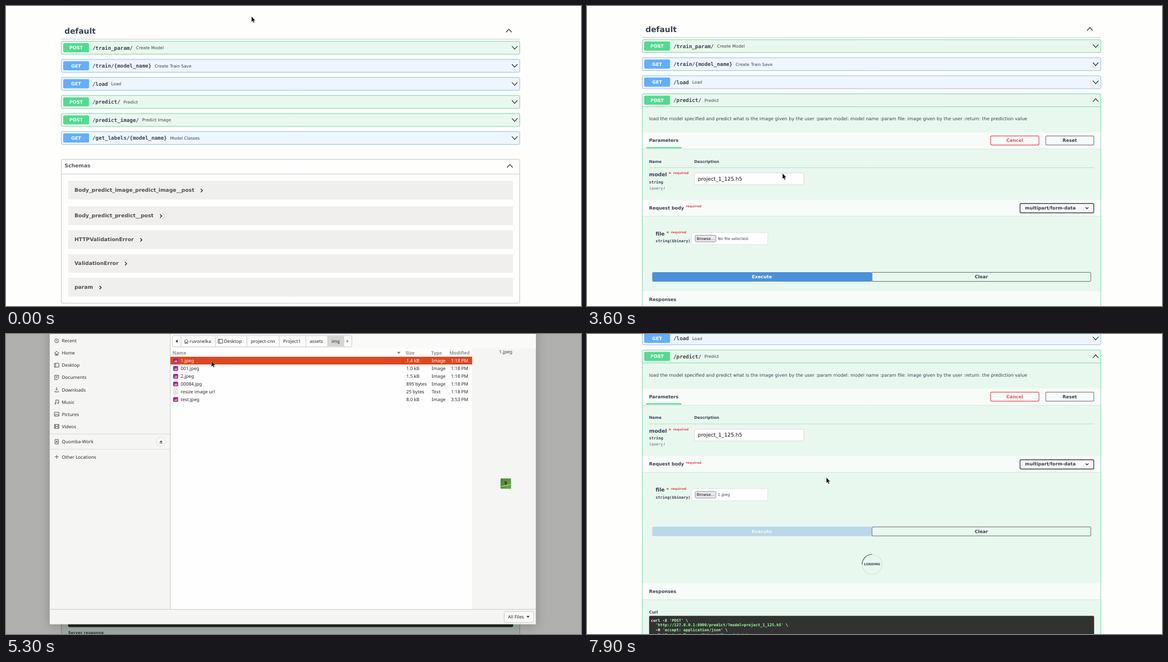
An HTML page with a canvas that plays this animation: 1035 by 541 pixels, repeating every 8 s.

```html
<!DOCTYPE html>
<html lang="en">
<head>
<meta charset="utf-8">
<title>API docs walkthrough</title>
<style>
  html, body { margin: 0; width: 100%; height: 100%; overflow: hidden; background: #fefefd; }
  canvas { display: block; }
</style>
</head>
<body>
<canvas id="stage" width="1035" height="541"></canvas>
<script>
const c = document.getElementById('stage').getContext('2d');
c.textRendering = 'geometricPrecision';
const LOOP = 8000, STEP = 100;
const K = 0.5807; // page zoom: CSS px to stage px
const SANS = '"DejaVu Sans", sans-serif', MONO = '"DejaVu Sans Mono", monospace', UI = '"Noto Sans", sans-serif';
const INK = '#3b4151', RED = '#e2505c', GREEN = '#53db8f', BLUE = '#64aefc', LINE = '#c4c6c8';
const TONES = {
  POST: { badge: GREEN, fill: '#e9f8ee', edge: '#7fd8ae' },
  GET: { badge: BLUE, fill: '#eef6fd', edge: '#93c5f4' }
};

// ---- drawing helpers ----
function text(s, x, y, px, { style = '', family = SANS, color = INK, align = 'left' } = {}) {
  c.font = `${style} ${px * K}px ${family}`;
  c.fillStyle = color;
  c.textAlign = align;
  c.fillText(s, x, y + px * K * 0.365);
  return c.measureText(s).width;
}
const bold = (s, x, y, px = 14, color = INK, align = 'left') => text(s, x, y, px, { style: 'bold', color, align });
const code = (s, x, y, px = 12, color = INK, style = 'bold') => text(s, x, y, px, { style, family: MONO, color });
const ui = (s, x, y, color = '#2b2b2b', style = '500', align = 'left') => text(s, x, y, 14.2, { family: UI, color, style, align });

function box(x, y, x2, y2, fill, stroke, radius = 2, width = 1) {
  c.beginPath();
  c.roundRect(x, y, x2 - x, y2 - y, radius);
  if (fill) { c.fillStyle = fill; c.fill(); }
  if (stroke) { c.strokeStyle = stroke; c.lineWidth = width; c.stroke(); }
}
function poly(points, stroke, width = 1, fill) {
  c.beginPath();
  points.forEach(([x, y]) => c.lineTo(x, y));
  if (fill) { c.closePath(); c.fillStyle = fill; c.fill(); }
  if (stroke) { c.strokeStyle = stroke; c.lineWidth = width; c.stroke(); }
}
const rule = (x, x2, y, color = LINE, width = 1) => poly([[x, y], [x2, y]], color, width);
const chevron = (x, y, w = 5, h = 5, width = 1.15) =>
  poly([[x - w, y - h / 2], [x, y + h / 2], [x + w, y - h / 2]], '#222', width);
const triangle = (x, y, w, h, color) => poly([[x - w, y - h], [x + w, y - h], [x, y + h]], null, 0, color);
function button(label, x, y, x2, y2, color, edge) {
  box(x, y, x2, y2, null, edge, 2, 1.2);
  bold(label, (x + x2) / 2, (y + y2) / 2, 14, color, 'center');
}
function icon(path, x, y, color = '#444') {
  c.save();
  c.translate(x - 4.5, y - 4.5);
  c.strokeStyle = color;
  c.lineWidth = 0.9;
  c.stroke(new Path2D(path));
  c.restore();
}

// ---- timelines: rows of [time, ...values], linear in between ----
function track(keys, t) {
  let i = keys.findIndex(k => k[0] > t);
  if (i < 0) i = keys.length;
  const a = keys[Math.max(i - 1, 0)], b = keys[Math.min(i, keys.length - 1)];
  const p = b[0] > a[0] ? (t - a[0]) / (b[0] - a[0]) : 0;
  return a.slice(1).map((v, n) => typeof v === 'number' ? v + (b[n + 1] - v) * p : v);
}
const SCROLL = [[3400, 0], [3500, 1], [3600, 3], [3700, 40], [3800, 66], [3900, 66], [4000, 105], [4100, 132.5]];
const DIALOG = [[4300, 0], [4400, .15], [4600, .75], [4800, 1], [5700, 1], [5800, .6], [5900, .15], [6000, 0]];
const POINTER = [
  [0, 442, 19, 'arrow'], [300, 442, 19, 'arrow'], [500, 240, 70, 'hand'], [600, 127, 112, 'hand'],
  [700, 241, 145, 'hand'], [800, 241, 145, 'hand'], [900, 205, 176, 'hand'], [1600, 205, 176, 'hand'],
  [1700, 222, 200, 'arrow'], [2000, 303, 311, 'beam'], [2300, 303, 311, 'beam'], [2800, 352, 311, 'beam'],
  [2900, 352, 311, 'beam'], [3100, 352, 302, 'arrow'], [3900, 352, 302, 'arrow'], [4100, 204, 290, 'arrow'],
  [4900, 204, 290, 'arrow'], [5300, 370, 49, 'arrow'], [5700, 370, 49, 'arrow'], [6000, 352, 93, 'arrow'],
  [6200, 286, 334, 'arrow'], [6300, 286, 334, 'arrow'], [6600, 287, 349, 'hand'], [6700, 287, 350, 'hand'],
  [7000, 287, 350, 'hand'], [7100, 308, 337, 'arrow'], [7700, 431, 259, 'arrow']
];
const SHAPES = {
  arrow: 'M0 0V9.6L2.2 7.7L3.7 11.2L5.2 10.5L3.7 7.1H6.6Z',
  hand: 'M-.9 .8Q0-.6 .9 .8V4.2L4.6 5Q5.4 5.3 5.2 6.5L4.4 11H-.8L-3 7.4Q-3.2 6 -.9 7.2Z',
  beam: 'M-1.8-5H1.8V-4.4H.4V4.4H1.8V5H-1.8V4.4H-.4V-4.4H-1.8Z'
};
function pointer(t) {
  const [x, y, kind] = track(POINTER, t);
  const shape = new Path2D(SHAPES[kind]);
  c.save();
  c.translate(x, y);
  c.lineWidth = kind === 'hand' ? 0.9 : 1;
  c.fillStyle = kind === 'hand' ? '#fff' : '#1a1a1a';
  c.strokeStyle = kind === 'hand' ? '#222' : '#fff';
  c.stroke(shape);
  c.fill(shape);
  if (kind === 'hand') c.stroke(shape);
  c.restore();
}

// ---- API page ----
const ROUTES = [
  ['POST', '/train_param/', 'Create Model'], ['GET', '/train/{model_name}', 'Create Train Save'],
  ['GET', '/load', 'Load'], ['POST', '/predict/', 'Predict'],
  ['POST', '/predict_image/', 'Predict Image'], ['GET', '/get_labels/{model_name}', 'Model Classes']
];
const SCHEMAS = [['Body_predict_image_predict_image__post', 332], ['Body_predict_predict__post', 378],
  ['HTTPValidationError', 421], ['ValidationError', 464], ['param', 507]];
const CURL = `curl -X 'POST' \\
  'http://127.0.0.1:8000/predict/?model=project_1_125.h5' \\
  -H 'accept: application/json' \\
  -H 'Content-Type: multipart/form-data' \\
  -F 'file=@1.jpeg;type=image/jpeg'`.split('\n');

function route([method, path, note], i, open) {
  const y = 75.2 + i * 32.55, tone = TONES[method], bottom = open ? 900 : y + 11.6;
  c.save();
  c.shadowColor = 'rgba(0,0,0,.19)';
  c.shadowBlur = 2;
  box(99.7, y - 11.4, 924.7, bottom, tone.fill);
  c.restore();
  box(99.7, y - 11.4, 924.7, bottom, null, tone.edge);
  if (open) rule(100, 924.5, y + 11.8, tone.edge);
  box(103, y - 8.2, 149.5, y + 8.2, tone.badge);
  bold(method, 126.2, y, 14, '#fff', 'center');
  const width = code(path, 155.5, y, 16);
  text(note, 155.5 + width + 5.8, y, 13);
  chevron(915.6, y, 5, open ? -5.5 : 5.5);
}

function schemas() {
  box(99.5, 276.5, 924.7, 536, null, LINE);
  rule(100, 924.5, 303);
  bold('Schemas', 105.5, 288, 16, '#5a5c60');
  chevron(907, 288.5, 5, -5.5);
  for (const [name, y] of SCHEMAS) {
    box(111.8, y - 16.7, 912.8, y + 17, '#f1efee');
    const x = 123.2 + bold(name, 123.2, y, 16, '#505050') + 11.8;
    poly([[x, y - 2.2], [x + 3, y + .8], [x, y + 3.8]], '#222', 1.3);
  }
}

function strip(y, y2) {
  c.fillStyle = 'rgba(255,255,255,.65)';
  c.fillRect(100.2, y, 824, y2 - y);
  rule(100.2, 924.2, y2, 'rgba(0,0,0,.09)');
}
function required(x, y, star) {
  if (star) bold('*', x - 8.3, y + 2, 16, RED);
  bold('required', x, y, 10, RED);
}

function form(t) {
  text('load the model specified and predict what is the image given by the user :param model: model name ' +
    ':param file: image given by the user :return: the prediction value', 111.8, 206.3, 14);
  strip(231, 261);
  bold('Parameters', 111.8, 245.3);
  rule(106.5, 170.3, 258.6, GREEN, 2.2);
  button('Cancel', 726.5, 237.3, 813.5, 253.6, RED, RED);
  button('Reset', 825.7, 237.3, 912.3, 253.6, INK, '#7f8683');
  bold('Name', 111.8, 283.3, 12);
  bold('Description', 193, 283.3, 12);
  rule(111.8, 912.8, 294.6, '#c7d5cf');
  bold('model', 111.8, 306.7, 16);
  required(155, 304, true);
  code('string', 111.8, 320);
  code('(query)', 111.8, 331.3, 12, '#666b70', 'italic');
  const focused = t >= 2400 && t < 3100;
  box(193.2, 304.2, 390.4, 325.3, '#fff', focused ? '#5b9be0' : '#d6dcd8', 2, focused ? 1.6 : 1);
  text('project_1_125.h5', 199.5, 314.6, 16, { color: '#111' });
  if (focused && t % 1000 < 600) poly([[280.5, 309], [280.5, 320]], '#111', 0.8);

  strip(352.5, 382);
  bold('Request body', 111.8, 366.7);
  required(178, 364.2);
  box(779.5, 359.3, 912.2, 376, '#f7f8f7', '#41444e', 2, 1.4);
  bold('multipart/form-data', 788.3, 366.8);
  chevron(900, 367.3, 2.5, 2.6);

  bold('file', 123.5, 413.2, 16);
  required(151, 411, true);
  code('string($binary)', 123.5, 426.5);
  box(188.7, 411.2, 325.5, 433.3, '#fff', '#dde3df');
  const hover = t >= 4100 && t < 4400;
  box(194.8, 416.4, 232, 428.4, hover ? '#cfcfd6' : '#e9e9ed', '#8f8f9d');
  text('Browse...', 213.4, 422.2, 12, { color: '#111', align: 'center' });
  text(t < 5900 ? 'No file selected.' : '1.jpeg', 235.5, 422.2, 12);
}

function spinner(t) {
  const x = 513.2, y = 548, turn = ((t - 7900) * 0.36 - 135) * Math.PI / 180;
  const ring = (from, to, color) => {
    c.beginPath();
    c.arc(x, y, 18, from, to);
    c.strokeStyle = color;
    c.lineWidth = 1.2;
    c.stroke();
  };
  ring(0, 7, 'rgba(85,85,85,.12)');
  ring(turn - Math.PI / 4, turn + Math.PI / 4, '#5b625f');
  bold('LOADING', x, y - .4, 10, INK, 'center');
}

function results(t) {
  const loading = t >= 7000;
  box(117.4, 480, 513, 497, loading ? '#bad8e9' : '#4b90d9');
  bold('Execute', 314.8, 488.4, 14, loading ? '#f2f8f8' : '#fff', 'center');
  button('Clear', 513, 480.3, 906.8, 496.6, INK, '#7f8683');
  if (loading) {
    spinner(t);
    c.translate(0, 67.5);
  }
  strip(514.5, 544);
  bold('Responses', 111.8, 528.8);
  bold('Curl', 111.8, 566, 12);
  box(111.8, 573.3, 912.8, 623, '#313331');
  CURL.forEach((line, i) => {
    let x = 115;
    for (const part of line.split(/('[^']*')/))
      x += code(part, x, 581.2 + i * 8.72, 12, part[0] === "'" ? '#a2fca2' : '#fff');
  });
  box(895.5, 609.8, 906.7, 621.5, '#7d8492');
  box(899, 614.5, 903.2, 619.5, null, '#fff', 0, 0.9);
  rule(898, 904, 613, '#fff', 0.9);
  bold('Request URL', 111.8, 634, 12);
  box(111.8, 641.4, 912.8, 661, '#313331');
  code('http://127.0.0.1:8000/predict/?model=project_1_125.h5', 117.5, 651.3, 12, '#fff');
  bold('Server response', 111.8, 671.3, 12);
}

function page(t) {
  const [scroll] = track(SCROLL, t), open = t >= 1300;
  c.save();
  c.translate(0, -scroll);
  text('/openapi.json', 98, -3.2, 12, { color: '#777' });
  bold('default', 105.2, 44.9, 24);
  chevron(905.2, 44.5, 5, -5.5);
  rule(99.5, 925, 59.8);
  ROUTES.slice(0, open ? 4 : 6).forEach((r, i) => route(r, i, open && i === 3));
  if (open) form(t); else schemas();
  c.restore();
  if (!open) return;
  // the lower part of the page joins the scroll one repaint late
  c.save();
  c.translate(0, scroll > 4 ? -scroll : 0);
  results(t);
  c.restore();
}

// ---- file chooser ----
const HOME = 'M.5 5l4-4 4 4M2 4v4.5h2v-2.5h1v2.5h2v-4.5', DESK = 'M.5 1h8v7h-8zM2.5 1v7';
const PLACES = [
  ['Recent', 12.3, 'M1 4.5a3.5 3.5 0 1 0 7 0a3.5 3.5 0 1 0-7 0M4.5 2.5v2.5l1.5 1'],
  ['Home', 34.3, HOME], ['Desktop', 56.4, DESK],
  ['Documents', 78.4, 'M1 .5h7v5l-2.5 3h-4.5zM2.5 3h4M2.5 5h3'],
  ['Downloads', 100.5, 'M4.5 0v5M2.5 3.5l2 2 2-2M1.5 6.5v2h6v-2'],
  ['Music', 122.6, 'M3 7.5v-6.5h5v5.5M3 7.5a1 1 0 1 1-2 0a1 1 0 1 1 2 0M8 6.5a1 1 0 1 1-2 0a1 1 0 1 1 2 0'],
  ['Pictures', 144.6, 'M.5 1h8v7h-8zM1.5 7l2-3 2 2 1-1 1.5 2'],
  ['Videos', 166.7, 'M.5 1h8v7h-8zM2 1v7M7 1v7M2 4.5h5'],
  ['Quomba-Work', 194.2, 'M1.5 .5h6v8h-6zM3.5 3.5h2v2h-2z'],
  ['Other Locations', 221.5, 'M4.5 1v7M1 4.5h7']
];
const CRUMBS = [['ruvonelka', 315, 330.5], ['Desktop', 377, 392.5], ['project-cnn', 433.5, 440.8],
  ['Project1', 492, 498.8], ['assets', 539.7, 546.5], ['img', 579, 586]];
const FILES = [['1.jpeg', '1.4 kB'], ['001.jpeg', '1.0 kB'], ['2.jpeg', '1.5 kB'], ['00084.jpg', '895 bytes'],
  ['resize image url', '25 bytes', 'Text'], ['test.jpeg', '8.0 kB', 'Image', '3:53 PM']];

function chooser(selected) {
  const shift = selected ? 0 : 115, edge = '#cfccc8', pane = '#f5f5f3';
  c.save();
  c.shadowColor = 'rgba(0,0,0,.22)';
  c.shadowBlur = 18;
  c.shadowOffsetY = 3;
  box(78.7, -60, 953.7, 523.5, pane, null, 0);
  c.restore();
  box(296, -60, 953.7, 26, '#fafaf9', null, 0);
  box(296, 26, 839 + shift, 496.5, '#fefefe', null, 0);
  poly([[295.6, -60], [295.6, 496.5]], edge);
  rule(78.7, 953.7, 496.5, edge);
  for (const y of [180.2, 207.8]) rule(78.7, 295.5, y, '#dcdad7');
  for (const [name, y, path] of PLACES) {
    icon(path, 91.2, y);
    ui(name, 100.5, y);
  }
  box(271, 186, 287, 202, '#f8f8f6', '#e2e0dd', 8);
  triangle(279, 193.6, 2.6, -1.5, '#444');
  rule(276.4, 281.6, 196.6, '#444');

  box(299.5, 2.8, 622.5, 23, '#fbfbfa', edge, 3);
  box(579, 3.3, 608, 22.5, '#d7d6d4', null, 0);
  for (const x of [315, 377, 433.5, 492, 539.7, 579, 608]) poly([[x, 3], [x, 23]], edge);
  poly([[308.8, 10], [308.8, 16], [305.2, 13]], null, 0, '#333');
  poly([[613.4, 10], [613.4, 16], [617, 13]], null, 0, '#999');
  icon(HOME, 324.5, 13);
  icon(DESK, 386, 13);
  for (const [name, , x] of CRUMBS) ui(name, x, 13);

  const head = (s, x) => ui(s, x, 34, '#8b8e8f', 'bold');
  head('Name', 299.7);
  head('Size', 719.5 + shift);
  head('Type', 765.3 + shift);
  head('Modified', 798.3 + shift);
  triangle(707 + shift, 34, 3.2, 1.7, '#777');
  FILES.forEach(([name, size, type = 'Image', time = '1:18 PM'], i) => {
    const y = 48.3 + i * 13.95, active = selected && i === 0, color = active ? '#fff' : '#262626';
    if (active) box(296, 41, 839, 55, '#dc4821', null, 0);
    if (type === 'Text') {
      box(301.8, y - 4.5, 309, y + 4.5, '#fcfcfc', '#b9b9b9', 1, 0.8);
      for (const dy of [-1.5, .5, 2.5]) rule(303.5, 307.3, y + dy, '#aaa', 0.7);
    } else {
      box(300.8, y - 4.2, 309.8, y + 4.2, '#9b2c8c', null, 1.5);
      poly([[302.3, y + 2.8], [304.8, y - .8], [306, y + .6], [307.3, y - 2], [308.3, y + 2.8]], null, 0, '#e58fd0');
    }
    ui(name, 314.5, y, color);
    ui(size, 720.5 + shift, y, color);
    ui(type, 766.3 + shift, y, color);
    ui(time, 801 + shift, y, color);
  });

  if (selected) {
    ui('1.jpeg', 899.5, 32.3, '#3a3a3a', '', 'center');
    const leaf = c.createLinearGradient(890, 260, 909, 279);
    leaf.addColorStop(0, '#3f8a33');
    leaf.addColorStop(1, '#5fae48');
    box(890.2, 260.5, 909, 279, leaf, null, 0);
    poly([[891, 275], [900, 273.5], [908.5, 271]], '#c9d0a0', 1.2);
    box(897, 265.5, 902, 271.5, '#7b3526', null, 2.5);
  }
  box(896.7, 500.3, 949.7, 520, '#fbfbfa', edge, 3);
  ui('All Files', 903.5, 510.2);
  triangle(939.6, 510.2, 3, 1.6, '#333');
}

function draw(t) {
  c.fillStyle = '#fefefd';
  c.fillRect(0, 0, 1035, 541);
  page(t);
  const [open] = track(DIALOG, t);
  if (open > 0) {
    c.fillStyle = `rgba(0,0,0,${0.31 * open})`;
    c.fillRect(0, 0, 1035, 541);
    c.save();
    c.globalAlpha = open;
    c.translate(0, 230 * (1 - open) * 0.3);
    c.scale(1, 0.7 + 0.3 * open);
    chooser(t >= 5200);
    c.restore();
  }
  pointer(t);
}

function tick(now) {
  draw(Math.floor(now % LOOP / STEP) * STEP);
  requestAnimationFrame(tick);
}
requestAnimationFrame(tick);
</script>
</body>
</html>
```
